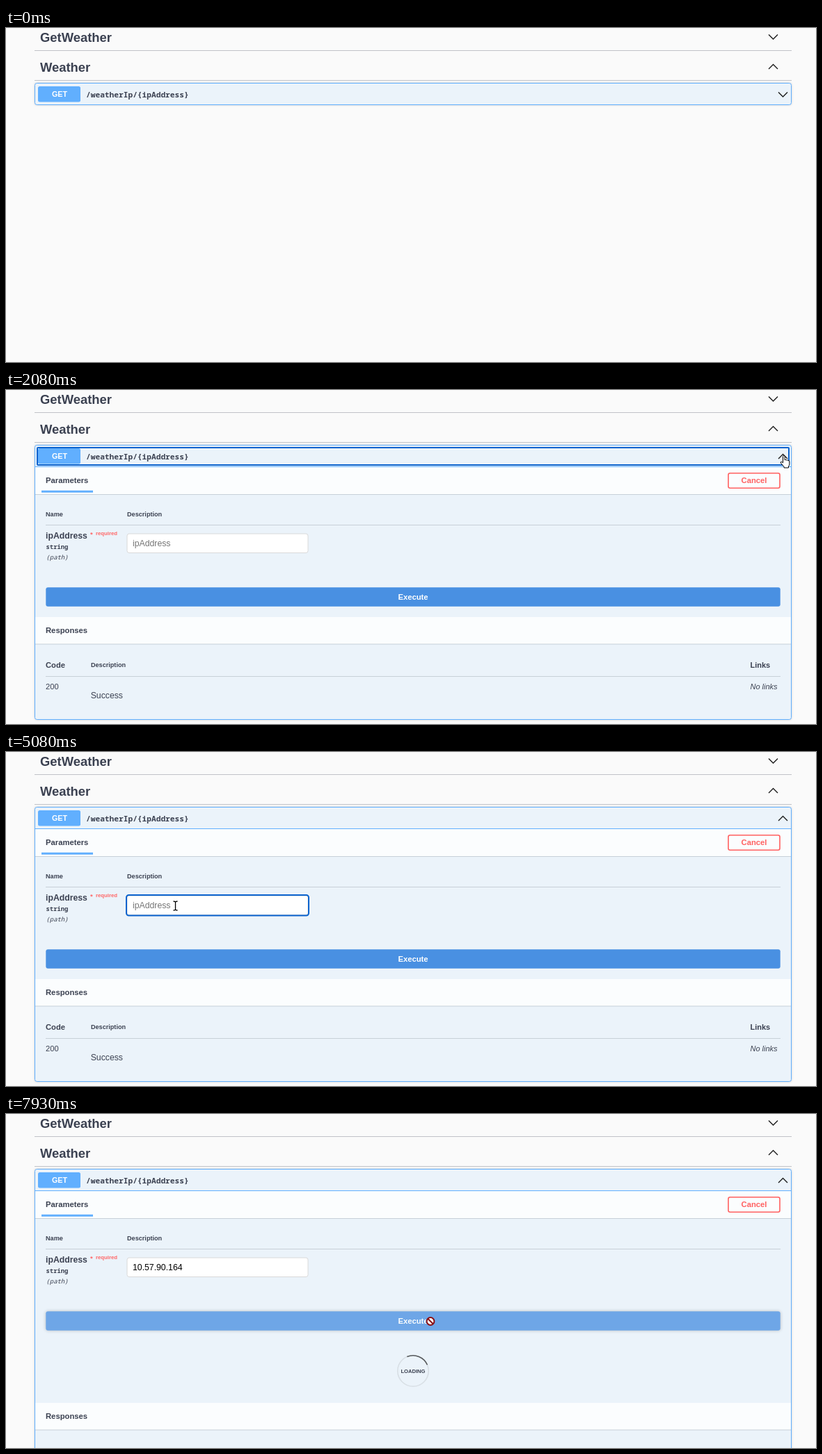
An HTML page for the animation above (7.99 s loop, 1164 by 481 pixels).

```html
<!DOCTYPE html>
<html lang="en">
<head>
<meta charset="utf-8">
<title>API explorer</title>
<style>
  html, body { margin: 0; width: 100%; height: 100%; overflow: hidden; background: #fafafa; }
  svg { display: block; }
  text { font-family: "Liberation Sans", Arial, sans-serif; fill: #3b4151; white-space: pre; }
  .b { font-weight: 700; }
  .mono { font-family: "Noto Sans Mono", "DejaVu Sans Mono", monospace; }
  .mid { text-anchor: middle; }
  .rule { stroke: #3b4151; stroke-opacity: .3; }
  .thin { stroke: #3b4151; stroke-opacity: .2; }
  .chev { fill: none; stroke: #1c1c1c; stroke-width: 1.4; }
  .bar { fill: #fbfdfe; }
  .ring { fill: none; stroke: #0b63ce; stroke-width: 2; }
  .shadow { filter: drop-shadow(0 0 1.5px rgba(0, 0, 0, .19)); }
  #cursor path { fill: #fff; stroke: #000; stroke-width: 1; stroke-linejoin: round; }
</style>
</head>
<body>
<svg width="1164" height="481" viewBox="0 0 1164 481">
  <text class="b" x="49" y="20" font-size="18.4">GetWeather</text>
  <path class="chev" d="M1096 9.5l6.5 6.5 6.5-6.5"/>
  <path class="rule" d="M41 32.5H1129"/>
  <text class="b" x="49" y="63" font-size="18.4">Weather</text>
  <path class="chev" d="M1096 59l6.5-6.5 6.5 6.5"/>
  <path class="rule" d="M41 75.5H1129"/>

  <rect id="box" class="shadow" x="41.5" y="79.5" width="1087" height="31" rx="3" fill="#ebf3fa" stroke="#61affe"/>
  <rect x="46" y="84" width="61" height="22.5" rx="2.5" fill="#61affe"/>
  <text class="b mid" x="77" y="99" font-size="10.7" style="fill:#fff">GET</text>
  <text class="b mono" x="115" y="100" font-size="11.2">/weatherIp/{ipAddress}</text>
  <path id="chevron" class="chev"/>

  <g id="panel">
    <path d="M42 110.5H1128" stroke="#61affe"/>
    <rect class="bar" x="42" y="111" width="1086" height="39"/>
    <path class="thin" d="M42 150.5H1128"/>
    <text class="b" x="57" y="134" font-size="11.25">Parameters</text>
    <rect x="51" y="144.7" width="74" height="3" fill="#61affe"/>
    <rect id="cancel" x="1038" y="119.7" width="74" height="21.5" rx="2.5" fill="#fbfdfe" stroke="#ff6060" stroke-width="1.6"/>
    <text class="b mid" x="1075" y="134" font-size="11.25" style="fill:#ff6060">Cancel</text>

    <text class="b" x="57" y="182" font-size="9.15">Name</text>
    <text class="b" x="174" y="182" font-size="9.15">Description</text>
    <path class="thin" d="M57 194.5H1113"/>
    <text class="b" x="57" y="214" font-size="12.25">ipAddress</text>
    <text class="b" x="121" y="211" font-size="9.5" style="fill:#f66">*</text>
    <text class="b" x="129" y="209" font-size="7.75" style="fill:#f66">required</text>
    <text class="b mono" x="57.5" y="229" font-size="8.9">string</text>
    <text class="mono" x="57.5" y="243.5" font-size="8.9" font-style="italic">(path)</text>
    <rect x="174" y="207" width="260" height="27.5" rx="3" fill="#fff" stroke="#d9d9d9"/>
    <rect id="inputRing" class="ring" x="173" y="206" width="262" height="29.5" rx="3.5"/>
    <text id="value" x="182" y="225.3" font-size="12.25"></text>
    <rect id="caret" y="214" width="1" height="14"/>

    <g id="execute">
      <rect x="57.3" y="284.3" width="1055.4" height="27.4" rx="3" fill="#4990e2"/>
      <text class="b mid" x="585" y="302" font-size="11.25" style="fill:#fff">Execute</text>
    </g>

    <g id="loader">
      <circle cx="585" cy="370" r="22.2" fill="none" stroke="#555" stroke-opacity=".13" stroke-width="1.6"/>
      <path id="arc" d="M-15.7-15.7A22.2 22.2 0 0 1 15.7-15.7" fill="none" stroke="#000" stroke-opacity=".6" stroke-width="1.6"/>
      <text class="b mid" x="585" y="373" font-size="7.6">LOADING</text>
    </g>

    <g id="responses">
      <rect class="bar" x="42" y="327" width="1086" height="38.5"/>
      <path class="thin" d="M42 366H1128"/>
      <text class="b" x="57" y="350" font-size="11.25">Responses</text>
      <text class="b" x="57" y="400" font-size="11.2">Code</text>
      <text class="b" x="122" y="399" font-size="9.1">Description</text>
      <text class="b" x="1069.5" y="400" font-size="11">Links</text>
      <path class="thin" d="M57 412.5H1113"/>
      <text x="57" y="430.5" font-size="11.2">200</text>
      <text x="121.7" y="443.5" font-size="12.25">Success</text>
      <text x="1069.5" y="430.5" font-size="11" font-style="italic">No links</text>
    </g>
  </g>
  <rect id="headRing" class="ring" x="45" y="83" width="1080" height="25" rx="1"/>

  <g id="cursor">
    <path id="arrow" d="M0 0V11.5L2.7 9 4.6 13.4 6.4 12.6 4.6 8.4H8.2Z"/>
    <path id="hand" d="M-1.5 10V1.2a1.3 1.3 0 0 1 2.6 0V6.2q1-.8 2.4.3 1.3-.6 2.3.5 1.9-.3 2 1.6V12q0 2-1.3 3.5v2H0V16L-4.6 10.7q-.8-1.6.8-1.9 1 0 2.3 1.8z"/>
    <path id="beam" style="fill:none;stroke-width:1.3" d="M-3-6.5Q0-6.5 0-5V5Q0 6.5-3 6.5M3-6.5Q0-6.5 0-5M3 6.5Q0 6.5 0 5"/>
    <g id="blocked" fill="#fff" stroke="#8a1016" stroke-width="2">
      <circle r="5.4"/><path style="stroke:#8a1016;stroke-width:2" d="M-3.8-3.8L3.8 3.8"/>
    </g>
  </g>
</svg>
<script>
const LOOP = 7990;
const PRESS_HEAD = 1980, OPEN = 2080, FOCUS = 4550, PASTE = 6220, BLUR = 7650, LOAD = 7790;
const $ = id => document.getElementById(id);
const show = (id, on) => $(id).style.display = on ? '' : 'none';
const clamp = v => Math.max(0, Math.min(1, v));

// Pointer moves: start, end, number of steps, waypoints
const moves = [
  [200, 660, 7, [[1090, 410], [1095, 320], [1108, 130], [1111, 84]]],
  [860, 1130, 5, [[1111, 84], [1120, 92], [1118, 95.5]]],
  [1390, 1520, 2, [[1118, 95.5], [1118, 94.5]]],
  [2160, 2710, 7, [[1118, 94.5], [900, 150], [480, 212], [365, 225]]],
  [2830, 3570, 9, [[365, 225], [470, 228], [820, 180], [1115, 125], [1115, 125]]],
  [3640, 4350, 9, [[1113, 122], [720, 140], [310, 168], [228, 215], [243.5, 221.5]]],
  [6550, 6890, 6, [[243.5, 221.5], [400, 262], [591, 322]]],
  [6960, 7260, 5, [[591, 322], [604, 294]]],
  [7380, 7450, 2, [[604, 294], [610, 298.5]]]
];

function pointer(t) {
  const [start, end, steps, points] = moves.findLast(m => t >= m[0]) || moves[0];
  const step = Math.min(steps, Math.floor((t - start) / (end - start) * (steps - 1) + .01) + 1);
  const p = step / steps;
  const u = p * p * (3 - 2 * p) * (points.length - 1);
  const i = Math.min(points.length - 2, Math.floor(u));
  const [a, b] = [points[i], points[i + 1]];
  return [0, 1].map(k => a[k] + (b[k] - a[k]) * (u - i));
}

function pointerShape(t, x, y) {
  const over = (l, top, r, bottom) => x >= l && x <= r && y >= top && y <= bottom;
  if (t >= LOAD) return 'blocked';
  if (over(41, 80, 1129, 111)) return 'hand';
  if (t >= OPEN) {
    if (over(1037, 119, 1117, 142) || over(57, 284, 1113, 312)) return 'hand';
    if (over(174, 207, 434, 235)) return 'beam';
  }
  return 'arrow';
}

function render(t) {
  const within = (a, b) => t >= a && t < b;
  const open = t >= OPEN, loading = t >= LOAD, pasted = t >= PASTE;
  const held = LOAD + Math.min(2, Math.floor((t - LOAD) / 70)) * 70;

  $('box').setAttribute('height', loading ? 484 : open ? 395 : 31);
  $('chevron').setAttribute('d', open ? 'M1110 99l6.5-6.5 6.5 6.5' : 'M1110 92.5l6.5 6.5 6.5-6.5');
  show('panel', open);
  show('headRing', within(PRESS_HEAD, FOCUS));
  show('inputRing', within(FOCUS, BLUR));

  $('value').textContent = pasted ? '10.57.90.164' : 'ipAddress';
  $('value').style.fill = pasted ? '#000' : '#757575';
  $('caret').setAttribute('x', pasted ? 253.5 : 182);
  show('caret', within(FOCUS, 5080) || within(5620, 6150) || within(PASTE, 6740) || within(7260, BLUR));

  const hover = clamp((t - 7100) / 300) * .3;
  $('execute').style.filter = hover ? `drop-shadow(0 0 2.5px rgba(0,0,0,${hover}))` : '';
  $('execute').style.opacity = loading ? 1 - (held - LOAD) / 140 * .23 : 1;
  show('loader', loading);
  $('arc').setAttribute('transform', `translate(585 370) rotate(${(held - 7869) * .36})`);
  $('responses').setAttribute('transform', `translate(0 ${loading ? 89 : 0})`);

  const [x, y] = pointer(t), shape = pointerShape(t, x, y);
  show('cursor', t >= 200 && !within(PASTE, 6550));
  $('cursor').setAttribute('transform', `translate(${x} ${y})`);
  for (const id of ['arrow', 'hand', 'beam', 'blocked']) show(id, id === shape);
}

const begin = performance.now();
function tick() {
  render((performance.now() - begin) % LOOP);
  requestAnimationFrame(tick);
}
tick();
</script>
</body>
</html>
```
